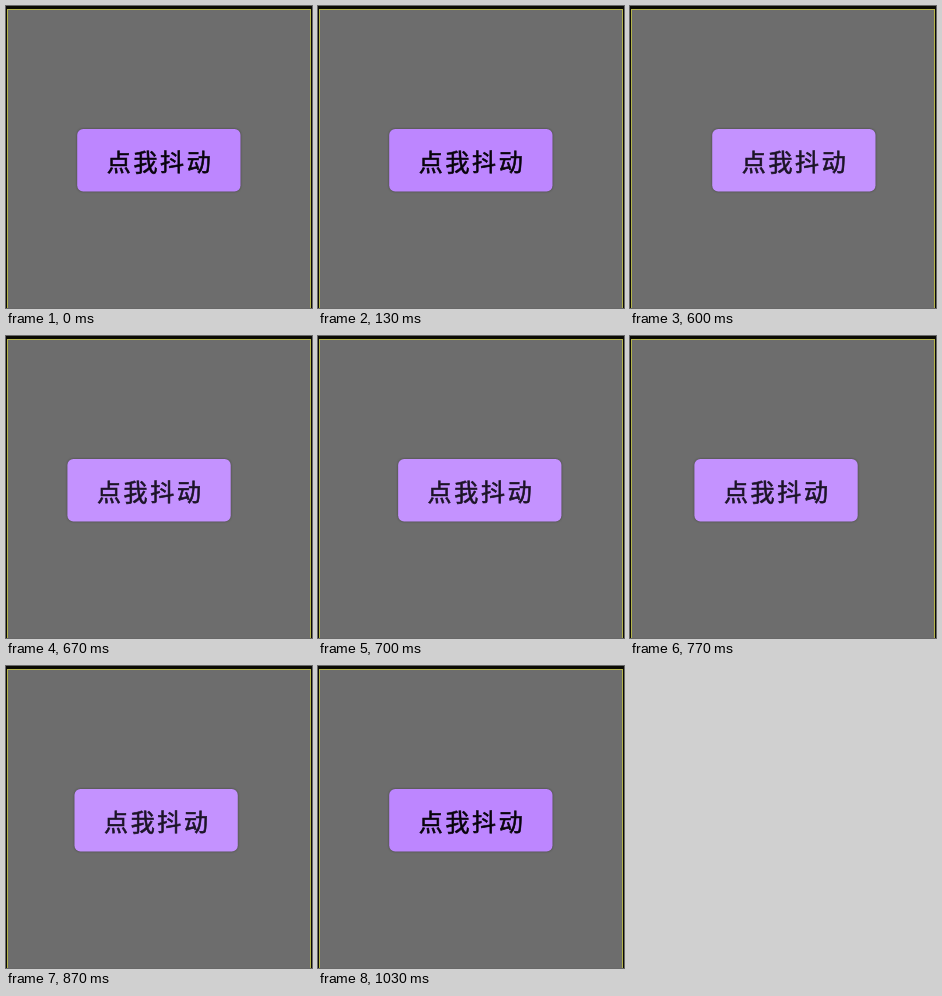
Animation of 306x302 px, one loop 1170 ms. Source, as an HTML page:

```html
<!DOCTYPE html>
<html lang="zh-CN">
<head>
<meta charset="utf-8">
<title>抖动按钮</title>
<style>
  html, body { margin: 0; width: 100%; height: 100%; overflow: hidden; background: #0b0b05; }
  svg { display: block; }
  #panel { fill: #6d6d6d; stroke: #b4b44c; }
  #button { filter: drop-shadow(0 .5px 1.2px rgba(0, 0, 0, .4)); }
  text {
    font: 500 24px "Noto Sans CJK SC", "Noto Sans CJK", sans-serif;
    letter-spacing: 2.7px;
    stroke-width: .6px;
  }
</style>
</head>
<body>
<svg width="306" height="302">
  <rect id="panel" x="1.5" y="3.5" width="303" height="310"/>
  <g id="shaker">
    <rect id="button" x="71.2" y="123" width="163.3" height="62.4" rx="6"/>
    <text id="label" x="100.7" y="165">点我抖动</text>
  </g>
</svg>
<script>
  const LOOP = 1170;
  const FPS = 30;
  const FIRST = 17;      // frame in which the shake begins
  const PRESS = 14;      // frames the button stays highlighted
  const SHAKE = 10.7;    // frames until the shake has died away
  const AMPLITUDE = 13;
  const REST = { fill: '#bd86ff', ink: '#08040c' };
  const PRESSED = { fill: '#c492ff', ink: '#1c1427' };

  const shaker = document.getElementById('shaker');
  const button = document.getElementById('button');
  const label = document.getElementById('label');

  // Decaying sine, one swing every three frames
  function offset(frame) {
    if (frame < 0 || frame > SHAKE) return 0;
    const decay = 1 - (frame / SHAKE) ** 1.6;
    return AMPLITUDE * decay * Math.sin(Math.PI * (2 * frame - 1) / 3);
  }

  function draw(time) {
    const frame = Math.floor(time * FPS / 1000 + 0.1) - FIRST;
    const look = frame >= 0 && frame < PRESS ? PRESSED : REST;
    shaker.setAttribute('transform', `translate(${offset(frame)} 0)`);
    button.setAttribute('fill', look.fill);
    label.setAttribute('fill', look.ink);
    label.setAttribute('stroke', look.ink);
  }

  const start = performance.now();
  function tick() {
    draw((performance.now() - start) % LOOP);
    requestAnimationFrame(tick);
  }
  draw(0);
  requestAnimationFrame(tick);
</script>
</body>
</html>
```
